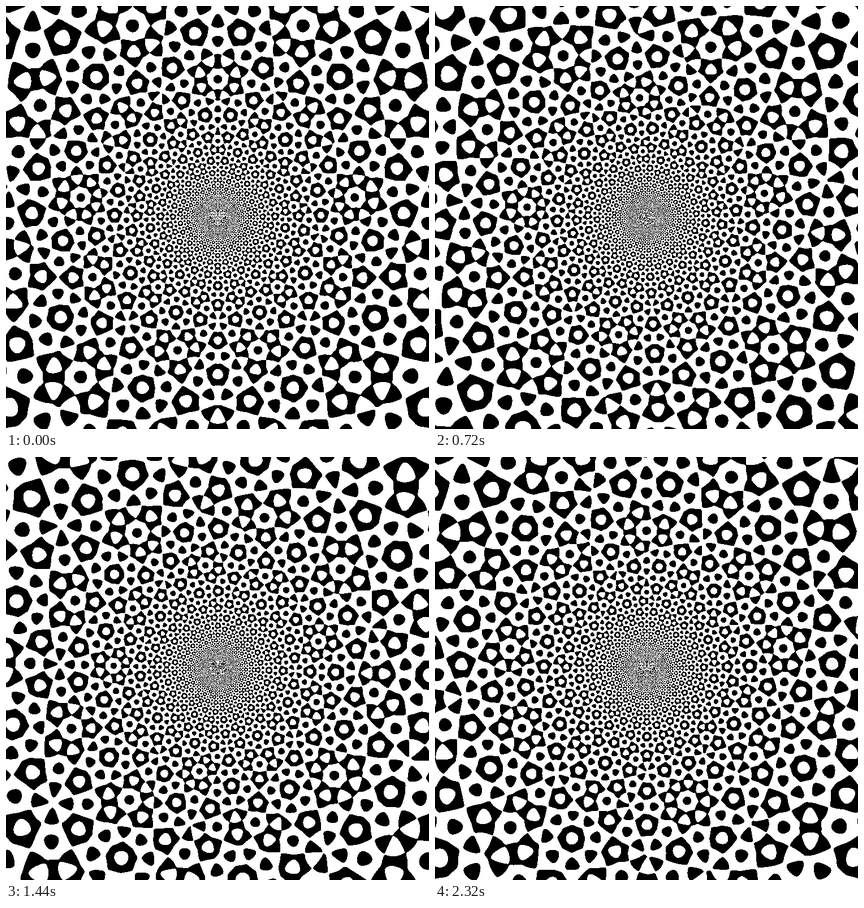
An HTML page with a canvas that plays this animation: 748x748 px, repeating every 2.4 s.

```html
<!DOCTYPE html>
<html>
<head>
<meta charset="utf-8">
<style>
html, body { margin: 0; width: 100%; height: 100%; overflow: hidden; background: #fff; }
canvas { display: block; }
</style>
</head>
<body>
<canvas id="view" width="748" height="748"></canvas>
<script>
// Four plane waves, 45 degrees apart, summed in log-polar space and cut to black and white.
const SIZE = 748, WAVES = 4, FREQ = 75, LEVEL = -0.2;
const STEP = 80, STEPS = 30;
const ctx = document.getElementById('view').getContext('2d');
const image = ctx.createImageData(SIZE, SIZE);
const pixels = new Uint32Array(image.data.buffer);
const BLACK = 0xff000000, WHITE = 0xffffffff;

// Sum of cos(p + phase) = even * cos(phase) - odd * sin(phase)
const even = new Float32Array(SIZE * SIZE);
const odd = new Float32Array(SIZE * SIZE);

for (let y = 0, i = 0; y < SIZE; y++) {
  for (let x = 0; x < SIZE; x++, i++) {
    const dx = x - SIZE / 2, dy = y - SIZE / 2;
    const u = Math.atan2(dx, dy);
    const v = -Math.log(Math.max(Math.hypot(dx, dy), 0.5) * 1.5 / SIZE);
    for (let n = 0; n < WAVES; n++) {
      const a = n * Math.PI / WAVES;
      const p = FREQ * (u * Math.cos(a) + v * Math.sin(a));
      even[i] += Math.cos(p);
      odd[i] += Math.sin(p);
    }
  }
}

let shown = -1;

function draw(step) {
  const phase = 2 * Math.PI * step / STEPS;
  const c = Math.cos(phase), s = Math.sin(phase);
  for (let i = 0; i < pixels.length; i++) {
    pixels[i] = even[i] * c - odd[i] * s < LEVEL ? BLACK : WHITE;
  }
  ctx.putImageData(image, 0, 0);
}

function tick() {
  const step = Math.floor(performance.now() / STEP) % STEPS;
  if (step !== shown) draw(shown = step);
  requestAnimationFrame(tick);
}
tick();
</script>
</body>
</html>
```
